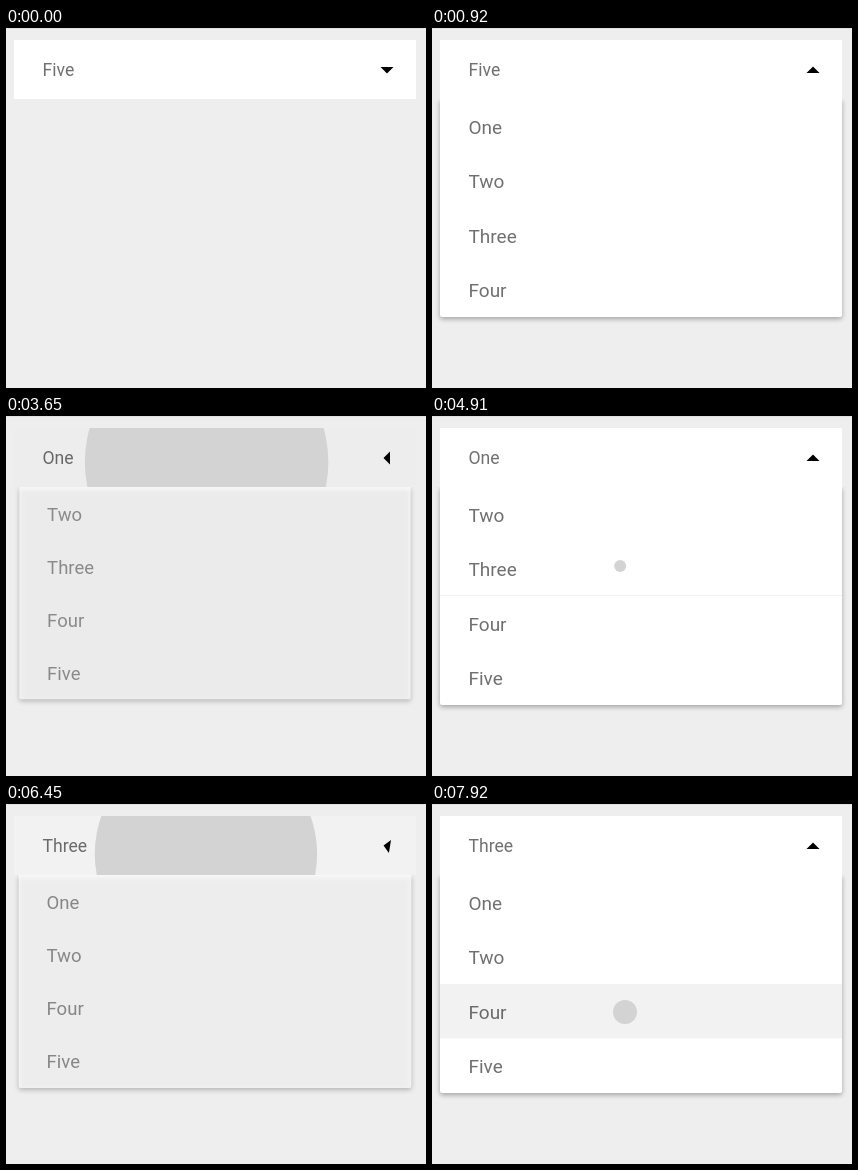
Recreate the animation shown at these times as an HTML page with a canvas. Size 420 by 360 pixels, loop 7.99 s.

```html
<!DOCTYPE html>
<html lang="en">
<head>
<meta charset="utf-8">
<title>Spinner</title>
<style>
  html, body { margin: 0; width: 100%; height: 100%; overflow: hidden; background: #eee; }
  canvas { display: block; width: 420px; height: 360px; }
</style>
</head>
<body>
<canvas id="stage"></canvas>
<script>
const W = 420, H = 360, LOOP = 7990, STEP = 70, PHASE = 10, ANIM = 300;
const LEFT = 8, WIDTH = 402, MID = LEFT + WIDTH / 2;
const HEAD_TOP = 12, HEAD_H = 59, LIST_TOP = 71, ROW_H = 54.5;
const INK = 'rgba(0,0,0,.56)';
const WORDS = ['One', 'Two', 'Three', 'Four', 'Five'];

// Each tap: press time, release time, touch point; a pick also has its list row.
const TAPS = [
  { press: 480, click: 480, x: 189, y: 56 },
  { press: 1946, click: 2160, x: 188, y: 98, row: 0 },
  { press: 3430, click: 3500, x: 188, y: 52.5 },
  { press: 4886, click: 5240, x: 187.5, y: 150, row: 1 },
  { press: 6290, click: 6290, x: 189, y: 60 },
  { press: 7872, click: 9000, x: 192, y: 208, row: 2 }
];

const canvas = document.getElementById('stage');
const ctx = canvas.getContext('2d');
const dpr = window.devicePixelRatio || 1;
canvas.width = W * dpr;
canvas.height = H * dpr;

const clamp = v => Math.max(0, Math.min(1, v));
const easeOut = u => 1 - (1 - u) ** 2;
const easeInOut = u => (1 - Math.cos(Math.PI * u)) / 2;

function stateAt(t) {
  const s = { selected: 4, listed: 4, open: false, since: Infinity, tap: null };
  for (const tap of TAPS) {
    if (t < tap.press) break;
    s.tap = tap;
    if (t < tap.click) break;
    s.since = t - tap.click;
    s.open = tap.row === undefined;
    if (s.open) s.listed = s.selected;
    else s.selected = tap.row + (tap.row >= s.listed ? 1 : 0);
  }
  return s;
}

function label(text, x, y, size) {
  ctx.font = size + 'px Roboto, sans-serif';
  ctx.fillStyle = INK;
  ctx.fillText(text, x, y);
}

// Press highlight and growing circle, clipped to one row.
function ripple(tap, t, top, height) {
  const age = t - tap.press, after = Math.max(0, t - tap.click);
  const fade = 1 - clamp((after - 160) / 275);
  if (fade <= 0) return;
  const base = ctx.globalAlpha;
  const shade = 0.05 * clamp((age - 25) / 20) + 0.02 * clamp((age - 160) / 60);
  const radius = 0.25 * (Math.min(t, tap.click) - tap.press) + 0.695 * after;
  const pull = clamp(radius / 203);
  const cx = tap.x + (MID - tap.x) * pull;
  const cy = tap.y + (top + height / 2 - tap.y) * pull;
  ctx.save();
  ctx.beginPath();
  ctx.rect(LEFT, top, WIDTH, height);
  ctx.clip();
  ctx.globalAlpha = base * fade;
  ctx.fillStyle = `rgba(0,0,0,${shade})`;
  ctx.fillRect(LEFT, top, WIDTH, height);
  ctx.fillStyle = '#d3d3d3';
  ctx.beginPath();
  ctx.arc(cx, cy, radius, 0, 2 * Math.PI);
  ctx.fill();
  ctx.restore();
  if (tap.row !== undefined && shade === 0) {
    ctx.fillStyle = 'rgba(0,0,0,.055)';
    ctx.fillRect(LEFT, top + height - 1, WIDTH, 1);
  }
}

function arrow(turn) {
  ctx.save();
  ctx.translate(381, 42);
  ctx.rotate(Math.PI * turn);
  ctx.fillStyle = '#000';
  ctx.beginPath();
  ctx.moveTo(-6.5, -3);
  ctx.lineTo(6.5, -3);
  ctx.lineTo(0, 3.5);
  ctx.fill();
  ctx.restore();
}

function header(s, t) {
  ctx.fillStyle = '#fff';
  ctx.fillRect(LEFT, HEAD_TOP, WIDTH, HEAD_H);
  if (s.tap && s.tap.row === undefined) ripple(s.tap, t, HEAD_TOP, HEAD_H);
  label(WORDS[s.selected], 36.5, 48, 17.6);
  const turn = easeInOut(clamp(s.since / ANIM));
  arrow(s.open ? turn : 1 - turn);
}

function list(s, t) {
  const q = easeOut(clamp((s.since - 10) / (ANIM - 10)));
  const shown = s.open ? q : 1 - q;
  if (shown <= 0) return;
  const scale = 0.9 + 0.1 * shown;
  ctx.save();
  ctx.beginPath();
  ctx.rect(0, LIST_TOP, W, H);
  ctx.clip();
  ctx.globalAlpha = shown;
  ctx.translate(MID, LIST_TOP);
  ctx.scale(scale, scale);
  ctx.translate(-MID, -LIST_TOP);

  ctx.save();
  ctx.shadowColor = 'rgba(0,0,0,.32)';
  ctx.shadowBlur = 5 * dpr;
  ctx.shadowOffsetY = 2 * dpr;
  ctx.fillStyle = '#fff';
  ctx.beginPath();
  ctx.roundRect(LEFT, LIST_TOP, WIDTH, ROW_H * 4, [0, 0, 2, 2]);
  ctx.fill();
  ctx.restore();

  if (s.tap && s.tap.row !== undefined)
    ripple(s.tap, t, LIST_TOP + ROW_H * s.tap.row, ROW_H);
  WORDS.filter((_, i) => i !== s.listed)
    .forEach((word, i) => label(word, 36.5, LIST_TOP + ROW_H * i + 34.5, 19));
  ctx.restore();
}

function draw(t) {
  const s = stateAt(t);
  ctx.setTransform(dpr, 0, 0, dpr, 0, 0);
  ctx.fillStyle = '#eee';
  ctx.fillRect(0, 0, W, H);
  ctx.fillStyle = '#e1e1e1';
  ctx.fillRect(0, 0, W, 1);
  header(s, t);
  list(s, t);
}

const start = performance.now();
function tick() {
  const t = (performance.now() - start) % LOOP;
  draw(Math.max(0, Math.floor((t - PHASE) / STEP) * STEP + PHASE));
  requestAnimationFrame(tick);
}
tick();
</script>
</body>
</html>
```
